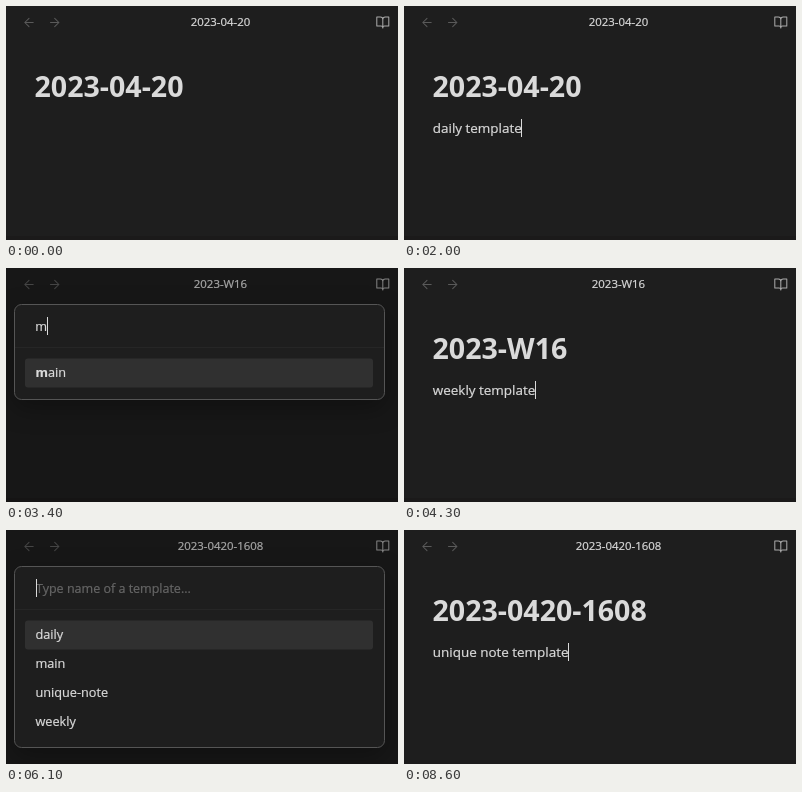
These frames come from a looping animation (392 px wide and 234 px high, 8.9 s). An HTML page:

```html
<!DOCTYPE html>
<html lang="en">
<head>
<meta charset="utf-8">
<title>Note templates</title>
<style>
  html, body { margin: 0; width: 100%; height: 100%; overflow: hidden; background: #1e1e1e; }
  #stage { display: block; width: 392px; height: 234px; font-family: "Open Sans", "Noto Sans", sans-serif; fill: #dadada; }
  #title, #body, #modal text { stroke: #dadada; stroke-width: .22; }
  #title { font-size: 11.4px; text-anchor: middle; }
  #heading { font-size: 28.6px; font-weight: 700; }
  #body { font-size: 13.45px; }
  #modal { font-size: 12.7px; }
  #modal #hint { font-size: 12.5px; fill: #666; stroke: #666; }
  .icon { fill: none; stroke: #5a5a5a; stroke-width: 1.7; stroke-linecap: round; stroke-linejoin: round; }
  .book { stroke: #aaa; }
  .panel { fill: #1e1e1e; stroke: #555; filter: drop-shadow(0 8px 12px rgba(0, 0, 0, .3)); }
  .bold { font-weight: 700; }
</style>
</head>
<body>
<svg id="stage" viewBox="0 0 392 234">
  <rect width="392" height="234" fill="#1e1e1e"/>
  <rect y="230" width="392" height="4" fill="#1b1a1a"/>
  <g class="icon">
    <path transform="translate(15.8 9.3) scale(.6)" d="M19 12H5M12 19l-7-7 7-7"/>
    <path transform="translate(41.5 9.3) scale(.6)" d="M5 12h14M12 5l7 7-7 7"/>
    <path class="book" transform="translate(369.6 9.3) scale(.6)"
      d="M2 3h6a4 4 0 0 1 4 4v14a3 3 0 0 0-3-3H2zM22 3h-6a4 4 0 0 0-4 4v14a3 3 0 0 1 3-3h7z"/>
  </g>
  <text id="title" x="214.5" y="20.3"></text>
  <text id="heading" x="28.5" y="91"></text>
  <text id="body" x="28.8" y="127.3"></text>

  <g id="modal">
    <rect width="392" height="234" opacity=".23" fill="#000"/>
    <rect id="panel" class="panel" x="8.5" y="36.5" width="370" rx="7"/>
    <path d="M9 79.5H378" stroke="#262626"/>
    <rect x="19" y="90.5" width="348" height="29" rx="3" fill="#303030"/>
    <g id="empty">
      <text id="hint" x="30" y="63">Type name of a template...</text>
      <text x="29.5" y="109.2">daily</text>
      <text x="29.5" y="138.2">main</text>
      <text x="29.5" y="167.2">unique-note</text>
      <text x="29.5" y="196.2">weekly</text>
    </g>
    <g id="typed">
      <text x="29.3" y="63">m</text>
      <text x="29.5" y="109.2"><tspan class="bold">m</tspan>ain</text>
    </g>
  </g>
  <rect id="caret" width="1" height="18"/>
</svg>
<script>
  const LOOP = 8900;
  const $ = id => document.getElementById(id);

  const note = (title, body = '', caret = false) => ({ title, body, caret });
  const modal = (title, query = '', caret = true) => ({ title, body: '', query, caret });

  const day = '2023-04-20', week = '2023-W16', unique = '2023-0420-1608';
  const steps = [
    [0, note(day)],
    [500, modal(day)],
    [1000, modal(day, 'm')],
    [1500, modal(day, 'm', false)],
    [2000, note(day, 'daily template', true)],
    [2500, note(day, 'daily template')],
    [2800, note(week)],
    [3100, modal(week)],
    [3300, modal(week, 'm')],
    [3700, modal(week, 'm', false)],
    [4300, note(week, 'weekly template', true)],
    [4900, note(week, 'weekly template')],
    [5300, note(unique)],
    [6100, modal(unique)],
    [6700, modal(unique, 'm')],
    [7300, modal(unique, 'm', false)],
    [7500, note(unique, 'unique note template', true)],
    [8000, note(unique, 'unique note template')],
    [8600, note(unique, 'unique note template', true)]
  ];

  const show = (id, on) => $(id).setAttribute('display', on ? 'inline' : 'none');

  function render(s) {
    const open = s.query !== undefined;
    $('title').textContent = s.title;
    // The panel covers the heading while the modal is open.
    $('heading').textContent = s.title;
    $('body').textContent = s.body;
    show('modal', open);
    show('empty', !s.query);
    show('typed', s.query);
    $('panel').setAttribute('height', s.query ? 95 : 181);
    show('caret', s.caret);
    const x = open ? (s.query ? 41 : 30) : Math.round(28.4 + $('body').getComputedTextLength());
    $('caret').setAttribute('x', x);
    $('caret').setAttribute('y', open ? 49 : 113);
  }

  let current;
  function tick() {
    const t = performance.now() % LOOP;
    const state = steps.filter(([at]) => at <= t).pop()[1];
    if (state !== current) render(current = state);
    requestAnimationFrame(tick);
  }
  tick();
</script>
</body>
</html>
```
